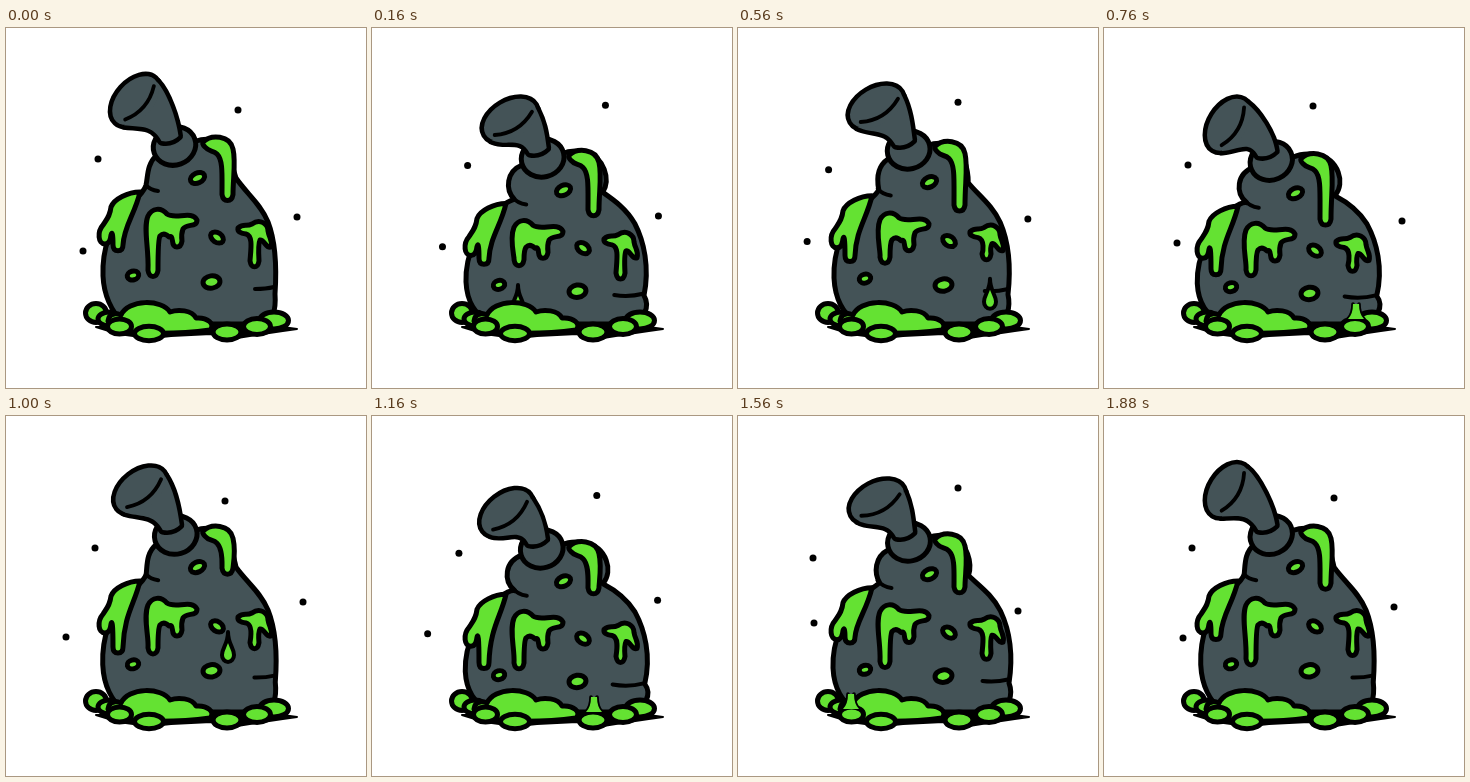
An HTML page that plays this animation: 360 px wide and 360 px high, repeating every 1920 ms.

```html
<!DOCTYPE html>
<html lang="en">
<head>
<meta charset="utf-8">
<title>Slime flask</title>
<style>
html, body { margin: 0; width: 100%; height: 100%; overflow: hidden; background: #fff; }
svg { display: block; width: 100vw; height: 100vh; }
</style>
</head>
<body>
<svg id="stage" viewBox="0 0 360 360" stroke="#000" stroke-width="5" stroke-linejoin="round" stroke-linecap="round"></svg>
<script>
const LOOP = 1920, BOUNCE = 480, STEP = 40, FALL = 220, SPLASH = 90;
const SKIN = '#445357', SLIME = '#64e232';
const stage = document.getElementById('stage');

const lerp = (a, b, k) => a + (b - a) * k;
const wrap = t => ((t % LOOP) + LOOP) % LOOP;

// Blend two path strings with the same commands.
function mix(a, b, k) {
  const end = b.match(/-?[\d.]+/g);
  let i = 0;
  return a.replace(/-?[\d.]+/g, n => lerp(+n, +end[i++], k).toFixed(2));
}

const path = (d, fill = 'none', extra = '') => `<path d="${d}" fill="${fill}" ${extra}/>`;
const oval = (x, y, rx, ry, turn = 0, fill = SLIME, extra = '') =>
  `<ellipse rx="${rx}" ry="${ry}" fill="${fill}" transform="translate(${x} ${y}) rotate(${turn})" ${extra}/>`;

const BODY = {
  tall: 'M150 128C141 136 142 148 140 157C138 165 130 170 122 178C104 198 96 222 97 248C98 270 106 284 118 296L258 296C268 292 270 280 269 266C271 236 269 212 262 194C255 176 240 165 230 150C226 138 224 122 214 114C204 110 196 111 190 113Z',
  flat: 'M150 140C132 146 130 166 143 176C140 174 132 178 128 182C108 198 92 228 93 256C94 276 102 286 118 296L258 296C274 292 281 278 273 268C280 240 273 214 263 196C254 182 242 174 231 169C243 156 235 132 214 128C204 126 196 127 190 130Z'
};
const CREASES = {
  tall: 'M140 157Q144 162 152 163M249 261Q260 261 268 259',
  flat: 'M139 172Q146 180 155 181M240 269Q256 272 272 268'
};

// Slime runs; each long finger grows, lets go of a drop, and springs back.
const RUNS = [
  { x: 222, top: 113, from: 155, to: 184, pow: .6, release: 930, floor: 296,
    shape: b => `M197 114C205 106 224 107 227 121C230 134 227 150 227 ${b - 8}q-1 6 -5.5 6t-5.5 -6C216 146 217 132 211 126C207 122 203 124 199 119Q196 116 197 114Z` },
  { x: 113, top: 175, from: 220, to: 243, pow: 1.3, release: 1340, floor: 293,
    shape: b => `M134 164C122 164 108 171 105 179C104 188 101 191 97 197C91 204 92 216 99 216Q104 216 105 207C106 203 107 206 107 ${b - 8}q0 6 5 6t5 -6C118 198 129 186 134 164Z` },
  { x: 146, top: 185, from: 228, to: 252, pow: 1, release: 130, floor: 292,
    shape: b => `M142 ${b - 8}C143 220 137 200 142 188C146 180 155 179 161 186C169 192 186 182 191 192C191 200 181 195 177 201Q175 206 176 213q-1 6 -5 6t-4.5 -6Q166 207 163 209Q158 204 154 208Q152 211 152 ${b - 8}q-1 6 -5 6t-5 -6Z` },
  { x: 252, top: 198, from: 230, to: 245, pow: 1, release: 530, floor: 291,
    shape: b => `M232 200C238 195 240 199 246 196C254 190 262 196 262 203C263 210 267 212 265 219C260 221 258 211 254 212Q252 216 253 ${b - 8}q-1 6 -4.5 6t-4.5 -6C245 220 247 208 240 206Q231 205 232 200Z` }
];

const SPOTS = [[191.5, 150, 7.5, 5, -25], [211, 209.5, 7, 4.8, 35], [205.5, 254, 8.5, 6.2, -8], [127, 247.5, 5.8, 4.4, -15]];

const PUDDLE =
  path('M90 299Q130 313 165 308L205 306 225 311Q262 305 291 301L262 297Z', '#000', 'stroke-width="2"') +
  oval(90, 285, 10.5, 9.5) + oval(103, 291, 11, 7) + oval(268, 292.5, 14.5, 8.5) +
  path('M102 293C103 285 110 285 115 287C122 271 156 271 164 284C172 281 186 282 190 290C201 289 210 296 204 302Q160 308 112 303Z', SLIME) +
  [[113.5, 298.5, 12, 7.5], [143, 305.5, 14.5, 7.2], [221, 304, 14, 8], [251, 298.5, 13.5, 8]].map(b => oval(...b)).join('');

// Floating specks: x and y at each key time.
const KEYS = [0, 360, 760, 1000, 1320, 1560, 1880];
const SPECKS = [
  [[232, 232, 209, 219, 228, 220, 230], [82, 73, 78, 85, 73, 72, 82]],
  [[92, 97, 84, 89, 83, 75, 88], [131, 144, 137, 132, 143, 142, 132]],
  [[291, 283, 298, 297, 275, 280, 290], [189, 188, 193, 186, 185, 195, 191]],
  [[77, 65, 73, 60, 56, 76, 79], [223, 214, 215, 221, 213, 207, 222]]
];

// Smooth periodic curve through the key values.
function drift(values, t) {
  const n = KEYS.length;
  const time = i => KEYS[(i + n) % n] + LOOP * Math.floor(i / n);
  const value = i => values[(i + n) % n];
  const slope = i => (value(i + 1) - value(i - 1)) / (time(i + 1) - time(i - 1));
  let i = n - 1;
  while (KEYS[i] > t) i--;
  const h = time(i + 1) - time(i), u = (t - time(i)) / h, v = 1 - u;
  return value(i) * (1 + 2 * u) * v * v + value(i + 1) * u * u * (3 - 2 * u)
    + h * u * v * (slope(i) * v - slope(i + 1) * u);
}

function drawPipe(lift, sway) {
  const cx = 168.5 + 2.5 * sway, cy = 126 - 8 * lift;
  const hx = 129.5 + 10 * sway, hy = 85.5 - 13 * lift;
  const turn = -48 + 20 * sway, a = turn * Math.PI / 180;
  const at = (u, v) => `${(hx + u * Math.cos(a) - v * Math.sin(a)).toFixed(2)} ${(hy + u * Math.sin(a) + v * Math.cos(a)).toFixed(2)}`;
  const near = (x, y) => `${cx + x} ${cy + y}`;
  const tube = `M${at(-26, 8)}C${at(-17, 21)} ${near(-22, -22)} ${near(-13, -5)}Q${near(-3, -3)} ${near(4, -10)}C${near(2, -27)} ${at(27, 18)} ${at(28, 4)}Z`;
  const parts = extra => path(tube, SKIN, extra) + oval(hx, hy, 28.5, 18, turn, SKIN, extra);
  return oval(cx, cy, 21.5, 19, -20 + 8 * sway, SKIN) +
    parts('stroke-width="9"') + parts('stroke="none"') +
    path(`M${at(-21, 5)}Q${at(1, 16)} ${at(23, 4)}`, 'none', 'stroke-width="3.8"');
}

function drawRun(run, t, squash) {
  const age = wrap(t - run.release);
  const b = lerp(run.from, run.to, (age / LOOP) ** run.pow);
  return path(run.shape(b), SLIME, `transform="translate(0 ${squash * sag(run.top)})"`);
}

function drawDrop(run, t) {
  const age = wrap(t - run.release);
  if (age >= FALL) return '';
  const { x } = run, y = lerp(run.to + 18, run.floor, age / FALL);
  return path(`M${x} ${y - 16}C${x} ${y - 4} ${x - 6} ${y} ${x - 6} ${y + 7}a6 7 0 0 0 12 0C${x + 6} ${y} ${x} ${y - 4} ${x} ${y - 16}Z`, SLIME, 'stroke-width="4"');
}

function drawSplash(run, t) {
  const age = wrap(t - run.release) - FALL;
  if (age < 0 || age >= SPLASH) return '';
  const { x, floor: y } = run;
  return path(`M${x - 8} ${y}Q${x - 3} ${y - 5} ${x - 3} ${y - 15}M${x + 3} ${y - 15}Q${x + 3} ${y - 5} ${x + 8} ${y}`, 'none', 'stroke-width="3.6"') +
    path(`M${x - 8} ${y}Q${x - 3} ${y - 5} ${x - 3} ${y - 15}H${x + 3}Q${x + 3} ${y - 5} ${x + 8} ${y}Z`, SLIME, 'stroke="none"');
}

const sag = y => 18 - (y - 110) * .04;

function draw(t) {
  const phase = t / BOUNCE * 2 * Math.PI;
  const lift = Math.cos(phase), sway = Math.sin(phase), squash = (1 - lift) / 2;
  const all = fn => RUNS.map(run => fn(run, t, squash)).join('');
  stage.innerHTML =
    path(mix(BODY.tall, BODY.flat, squash), SKIN) +
    path(mix(CREASES.tall, CREASES.flat, squash), 'none', 'stroke-width="4"') +
    all(drawRun) +
    SPOTS.map(([x, y, ...rest]) => oval(x, y + squash * sag(y), ...rest)).join('') +
    drawPipe(lift, sway) +
    all(drawDrop) + PUDDLE + all(drawSplash) +
    SPECKS.map(([xs, ys]) => oval(drift(xs, t), drift(ys, t), 3.5, 3.5, 0, '#000', 'stroke="none"')).join('');
}

const start = performance.now();
function tick(now) {
  draw(Math.floor(wrap(Math.max(0, now - start)) / STEP) * STEP);
  requestAnimationFrame(tick);
}
draw(0);
requestAnimationFrame(tick);
</script>
</body>
</html>
```
